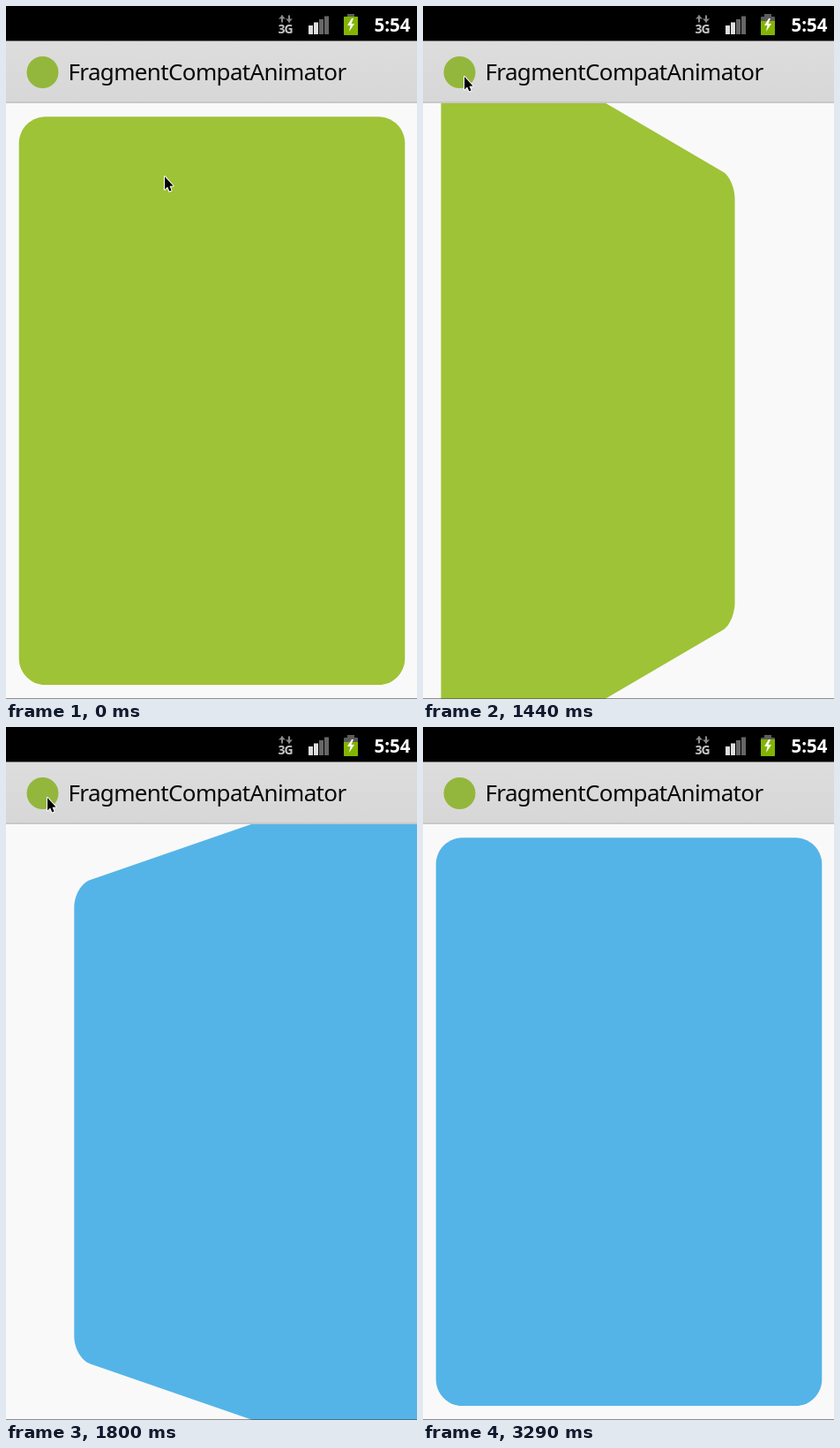
Recreate the animation shown at these times as an HTML page with a canvas. Size 466 px wide and 784 px high, loop 3460 ms.

```html
<!DOCTYPE html>
<html lang="en">
<head>
<meta charset="utf-8">
<title>FragmentCompatAnimator</title>
<style>
  html, body { margin: 0; width: 100%; height: 100%; overflow: hidden; background: #f9f9f9; }
  canvas { display: block; width: 466px; height: 784px; }
</style>
</head>
<body>
<canvas id="stage" width="466" height="784"></canvas>
<script>
const ctx = document.getElementById('stage').getContext('2d');
const W = 466, H = 784, LOOP = 3460, STEP = 60, LAST = 3290;
const GREEN = '#9ec337', BLUE = '#54b4e8';
const TITLE_FONT = '26px "Noto Sans", "Open Sans", sans-serif';
const STATUS_FONT = '"Open Sans", "Noto Sans", sans-serif';

// Card flip: two eased quarter turns seen by a camera at a fixed distance
const CARD = { x: 233.5, y: 446.7, w: 218.8, h: 321.4, r: 30 };
const CAMERA = 558, OUT_START = 1271, IN_START = 1598, TURN = 336;

const clamp = v => Math.max(0, Math.min(1, v));
const ease = v => (1 - Math.cos(Math.PI * clamp(v))) / 2;
const mix = (a, b, k) => a + (b - a) * k;
const progress = (t, start, length) => clamp((t - start) / length);

function rect(color, x, y, w, h) {
  ctx.fillStyle = color;
  ctx.fillRect(x, y, w, h);
}

function polygon(color, points) {
  ctx.beginPath();
  points.forEach(([x, y]) => ctx.lineTo(x, y));
  ctx.closePath();
  ctx.fillStyle = color;
  ctx.fill();
}

function label(text, x, y, font, color, spacing = '0px') {
  ctx.font = font;
  ctx.letterSpacing = spacing;
  ctx.fillStyle = color;
  ctx.fillText(text, x, y);
}

function cardOutline(angle) {
  const points = [], n = 14;
  const cos = Math.cos(angle), sin = Math.sin(angle);
  for (let corner = 0; corner < 4; corner++) {
    const sx = corner === 0 || corner === 3 ? 1 : -1;
    const sy = corner < 2 ? 1 : -1;
    for (let i = 0; i <= n; i++) {
      const a = (corner + i / n) * Math.PI / 2;
      const x = sx * (CARD.w - CARD.r) + CARD.r * Math.cos(a);
      const y = sy * (CARD.h - CARD.r) + CARD.r * Math.sin(a);
      const k = CAMERA / (CAMERA + x * sin);
      points.push([CARD.x + x * cos * k, CARD.y + y * k]);
    }
  }
  return points;
}

function drawCard(t) {
  const out = t < IN_START;
  const turn = ease(progress(t, out ? OUT_START : IN_START, TURN));
  const angle = (out ? turn : turn - 1) * Math.PI / 2;
  polygon(out ? GREEN : BLUE, cardOutline(angle));
}

function drawActionBar(t) {
  const shade = ctx.createLinearGradient(0, 39, 0, 108);
  shade.addColorStop(0, '#dddddd');
  shade.addColorStop(1, '#d7d7d7');
  rect(shade, 0, 39, W, 69);
  rect('#c8c8c8', 0, 108, W, 2);

  if (t >= 1200) {
    ctx.globalAlpha = 1 - progress(t, 1200, 200);
    rect('#74bfde', 12, 39, 59, 71);
    ctx.globalAlpha = 1;
  }

  ctx.beginPath();
  ctx.arc(41.5, 75, 18, 0, Math.PI * 2);
  ctx.fillStyle = '#93b73c';
  ctx.fill();
  label('FragmentCompatAnimator', 70.5, 84, TITLE_FONT, '#0a0a0a', '-0.65px');
}

// dir is -1 for up, 1 for down
function drawArrow(x, dir) {
  const y = 14.5;
  rect('#8a8a8a', x - 1, y - 4, 2, 8);
  polygon('#8a8a8a', [[x - 4, y], [x + 4, y], [x, y + 4 * dir]]);
}

function batteryTop(t) {
  if (t < 290) return 12;
  if (t < 1290) return 9;
  return t < LAST ? 17 : 14;
}

function drawBattery(t) {
  const top = batteryTop(t);
  ctx.save();
  ctx.beginPath();
  ctx.rect(387, 9, 8, 4);
  ctx.roundRect(383, 12, 16, 21, 1);
  ctx.clip();
  rect('#5c5c5c', 383, 8, 16, 25);
  rect('#83b402', 383, top, 16, 33 - top);
  ctx.restore();
  polygon('#fff', [[392, 14], [387, 22], [390.5, 22], [389, 29], [395, 20], [391.5, 20], [394, 14]]);
}

function drawStatusBar(t) {
  rect('#000', 0, 0, W, 39.5);
  drawArrow(313, -1);
  drawArrow(321, 1);
  label('3G', 308.5, 31, 'bold 14px ' + STATUS_FONT, '#c4c4c4', '-1px');
  for (let i = 0; i < 4; i++) {
    const h = 10 + i * 3.5;
    rect(i < 2 ? '#dedede' : '#666666', 343 + i * 6, 32 - h, 5, h);
  }
  drawBattery(t);
  label('5:54', 417.5, 28.5, 'bold 20.5px ' + STATUS_FONT, '#fff');
}

// Up to the icon, a pause, then a sweep down and out of the stage
function pointerAt(t) {
  if (t < 1920) {
    const rest = 1 - progress(t, 180, 720);
    return [mix(47, 180, rest ** 1.1), mix(80, 193, rest ** 1.55)];
  }
  const sweep = progress(t, 1920, 840), leave = progress(t, 2760, 180);
  return [
    mix(47, 404, ease(sweep ** 1.68)) - 8 * leave,
    mix(80, 712, ease(sweep ** 2.25)) + 49 * leave
  ];
}

function drawPointer(t) {
  if (t >= 3000) return;
  const [x, y] = pointerAt(t).map(Math.round);
  const arrow = new Path2D('M0 0V14.5L3.2 11.6L5.3 16.6L7.6 15.6L5.5 10.8L9.6 10.6Z');
  ctx.save();
  ctx.translate(x, y);
  ctx.lineJoin = 'round';
  ctx.lineWidth = 2;
  ctx.strokeStyle = '#fff';
  ctx.stroke(arrow);
  ctx.fillStyle = '#000';
  ctx.fill(arrow);
  ctx.restore();
}

function draw(t) {
  rect('#f9f9f9', 0, 0, W, H);
  drawCard(t);
  drawActionBar(t);
  drawStatusBar(t);
  rect('rgba(70,70,70,.6)', 0, 783, W, 1);
  drawPointer(t);
}

const start = performance.now();
function tick() {
  const t = (performance.now() - start) % LOOP;
  draw(t >= LAST ? LAST : Math.floor(t / STEP) * STEP);
  requestAnimationFrame(tick);
}
tick();
</script>
</body>
</html>
```
